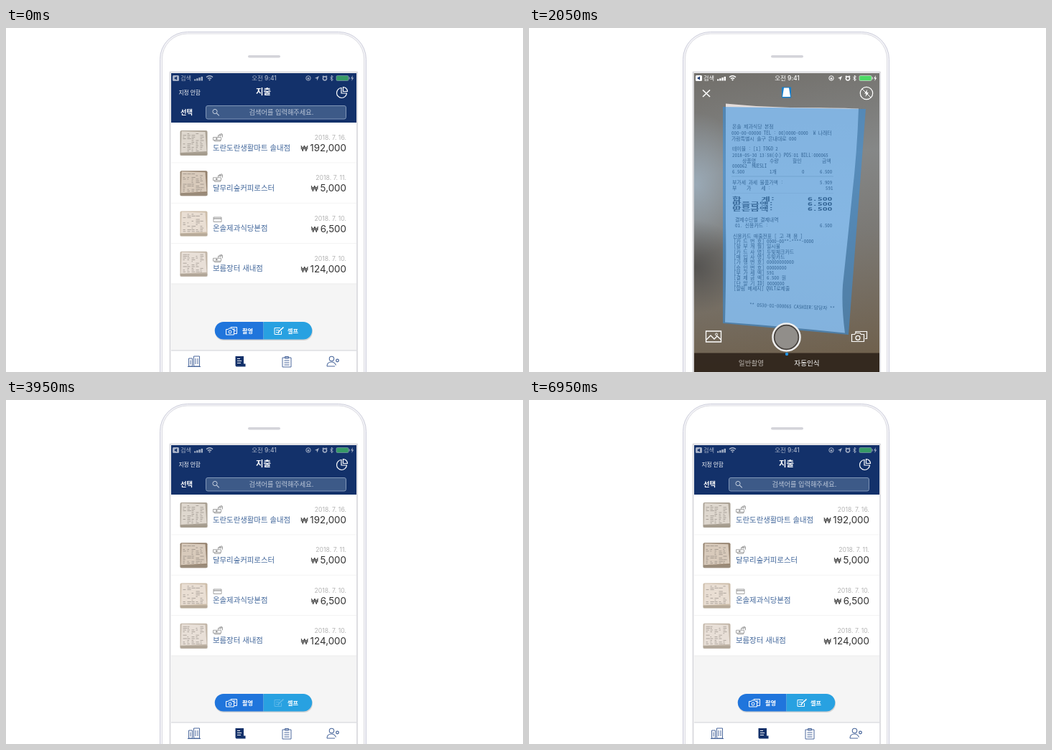
Write an HTML page that moves like this. It is 720x480 px and loops after 7000 ms.

```html
<!DOCTYPE html>
<html lang="ko">
<head>
<meta charset="utf-8">
<style>
html, body { margin: 0; width: 100%; height: 100%; overflow: hidden; background: #fff; }
svg { display: block; width: 720px; height: 480px; }
text { white-space: pre; font-family: Inter, "Noto Sans CJK KR", "Noto Sans CJK", sans-serif; }
.mono text { font-family: "Noto Sans Mono CJK KR", "Noto Sans CJK KR", "Noto Sans Mono", monospace; }
</style>
</head>
<body>
<svg id="stage" viewBox="0 0 720 480"></svg>
<script>
const NAVY = '#13316a', W = '#fff';
const text = (x, y, size, str, fill = W, extra = '') =>
  `<text x="${x}" y="${y}" font-size="${size}" fill="${fill}" ${extra}>${str}</text>`;
const rect = (x, y, w, h, fill, extra = '') =>
  `<rect x="${x}" y="${y}" width="${w}" height="${h}" fill="${fill}" ${extra}/>`;
const line = (d, stroke = W, w = 1, fill = 'none') =>
  `<path d="${d}" fill="${fill}" stroke="${stroke}" stroke-width="${w}"/>`;
const shape = (d, fill) => `<path d="${d}" fill="${fill}"/>`;
const disc = (x, y, r, fill, extra = '') => `<circle cx="${x}" cy="${y}" r="${r}" fill="${fill}" ${extra}/>`;
const ring = (x, y, r, stroke = W, w = 1) => disc(x, y, r, 'none', `stroke="${stroke}" stroke-width="${w}"`);
const at = (x, y, body) => `<g transform="translate(${x} ${y})">${body}</g>`;
const group = (id, body) => `<g id="${id}">${body}</g>`;
const BOLD = 'font-weight="700"', MID = 'text-anchor="middle"', END = 'text-anchor="end"';

let seed = 7;
const random = () => (seed = seed * 16807 % 2147483647) / 2147483647;

function statusBar() {
  const bars = [0, 1, 2, 3].map(i => rect(262 + i * 3.2, 71.5 - i * 1.2, 2.4, 2 + i * 1.2, W)).join('');
  return rect(232, 66, 9, 8, W, 'rx="1.5"') + shape('M238 67.5v5l-4-2.5z', NAVY) +
    text(243, 73, 8.2, '검색') + bars +
    line('M279 68.6q4.5-3.6 9 0M280.9 70.7q2.6-2 5.2 0', W, 1.4) + shape('M282 72l1.5 1.8 1.5-1.8q-1.5-1-3 0z', W) +
    text(359.5, 73, 8.5, '오전 9:41', W, MID + ' font-weight="500"') +
    ring(421, 70, 3.2) + rect(419.7, 69.3, 2.6, 2.2, W) +
    shape('M430 70l6-3-2.6 6.5-.6-3z', W) +
    ring(444, 70.3, 2.6, W, 1.5) + line('M440.8 68l1.6-1.4M445.6 66.6l1.6 1.4', W, 1.2) +
    line('M451.4 68l4 4-2 2v-8l2 2-4 4', W, .9) +
    rect(460, 66.5, 17, 7, '#4cd964', 'rx="1.5" stroke="#fff" stroke-width=".5"') + rect(477.6, 68.5, 1, 3, W) +
    shape('M482.8 66l-2.6 4.4h1.8l-.6 3.6 2.8-4.6h-1.8z', W);
}

function thumb(tone, paper) {
  let s = rect(0, 0, 38, 35, tone, 'rx="2"') + shape('M2 1l33 1 2 27-36 2z', paper);
  for (let y = 4; y < 28; y += 2.4) {
    for (let x = 4; x < 31; x += 6) {
      if (random() > .35) s += rect(x, y, 1.5 + random() * 4, .8, '#6d6660', 'opacity=".6"');
    }
  }
  return s + rect(0, 31, 38, 4, '#a2978a', 'opacity=".5"');
}

const cashIcon = line('M0 5.5h11v4h-11zM2 9.5v1.5h8v-1.5M7 5V2.5l6-1v4M8 3.2h4M8.5 1.5l4-1', '#999', .9) +
  disc(4.8, 7.5, 1.3, '#999');
const cardIcon = line('M.5 4.5h11v6.5h-11z', '#999', .9) + rect(.5, 5.8, 11, 1.3, '#999');

function listRow(i, name, date, sum, icon, tone, paper) {
  return at(0, 132 + i * 56.25,
    rect(230, 0, 258, 56.25, W) + rect(230, 55.7, 258, 1, '#ececec') +
    at(242.5, 11, thumb(tone, paper)) + at(288.5, 15, icon) +
    text(288, 38.5, 10.4, name, '#42679b') +
    text(474, 24, 8.7, date, '#b4b4b4', END) +
    text(474, 40, 13.4, `<tspan font-size="11">₩</tspan><tspan dx="2.5">${sum}</tspan>`, '#333', END));
}

function listPage() {
  const head = rect(230, 63, 258, 69, NAVY) +
    text(240.5, 93, 7.7, '지정 안함', W, 'font-weight="500"') + text(358.5, 93.3, 11.4, '지출', W, BOLD + MID) +
    line('M467 83.5a7 7 0 1 0 7.5 7.5h-7.5zM469.5 82.5v6h6a6 6 0 0 0-6-6z', W, 1.2) +
    text(243, 120.7, 9.2, '선택', W, BOLD) +
    rect(278.5, 108.5, 195, 18.5, '#3d5a88', 'rx="2.5" stroke="#8197b8"') +
    ring(291, 116.5, 3.1, '#c6d0df') + line('M293.3 118.8l3.5 3.5', '#c6d0df', 1.1) +
    text(383.5, 121, 9.2, '검색어를 입력해주세요.', '#bdc8d9', MID);
  const rows = listRow(0, '도란도란생활마트 솔내점', '2018. 7. 16.', '192,000', cashIcon, '#aaa194', '#ded7ce') +
    listRow(1, '달무리숲커피로스터', '2018. 7. 11.', '5,000', cashIcon, '#94816d', '#d8cabb') +
    listRow(2, '온솔제과식당본점', '2018. 7. 10.', '6,500', cardIcon, '#cdbda9', '#e9ded3') +
    listRow(3, '보름장터 새내점', '2018. 7. 10.', '124,000', cashIcon, '#c2b6a8', '#e8dfd7');
  const pill = rect(291, 411.5, 136, 24.5, '#000', 'rx="12.25" opacity=".14"') +
    shape('M358.5 410h-55.5a12.25 12.25 0 0 0 0 24.5h55.5z', '#2075dc') +
    shape('M358.5 410h55.5a12.25 12.25 0 0 1 0 24.5h-55.5z', '#28a1e1') +
    group('shootIcon', line('M306.5 420.5h3l1-1.5h4l1 1.5h2v7.5h-11zM313 418.5v-1h8.5v9h-4M315.5 420h4M318 422.5h2', W, 1) + ring(312, 424, 2)) +
    group('selfIcon', line('M382 418.5h-8v9h9.5v-4.5M376 421.5h4M376 424.5h2', W, 1) + line('M379 426l1-2.5 6.5-6', W, 1.7)) +
    text(336.5, 425.5, 8.2, '촬영', W, BOLD + MID) + text(399.5, 425.5, 8.2, '셀프', W, BOLD + MID);
  const C = '#4c699d';
  const tabs = rect(230, 450, 258, 32, W) + rect(230, 449.5, 258, 1, '#cfd2d8') +
    line('M254.5 472v-11h5v11zM261.5 472v-14h8v14zM253 472.5h18M257 463.5v6M264 461v8M267 461v8', C, 1) +
    shape('M319.5 458h11.5v10.5h2.5v4h-12.5q-1.5 0-1.5-2z', NAVY) +
    line('M322 461.5h4M322 464.5h6M322 467.5h5', W, 1) +
    line('M385 460h12v13h-12zM388.5 458.5h5v2.5h-5zM387.5 464h7M387.5 467h7M387.5 470h7', C, 1) +
    ring(453.5, 461.5, 3.2, C, 1.1) + line('M447 472q0-6 6.5-6 4 0 6 4.5M447 472h11', C, 1.1) +
    ring(461.5, 464, 1.8, C, 1.3);
  return rect(230, 63, 258, 420, '#f5f5f5') + head + rows + pill + tabs;
}

function keypad() {
  const letters = ['', 'ABC', 'DEF', 'GHI', 'JKL', 'MNO', 'PQRS', 'TUV', 'WXYZ'];
  const key = (col, row, digit, sub) => at(233.5 + col * 84.7, 350.5 + row * 33.7,
    rect(0, 1, 81, 29, '#8d9097', 'rx="3"') + rect(0, 0, 81, 29, W, 'rx="3"') +
    text(40, row < 3 ? 15.8 : 20, 16, digit, '#111', MID) +
    text(40.5, 24.7, 6, sub, '#222', MID + ' font-weight="600" letter-spacing="1"'));
  return rect(230, 319, 258, 28, '#f6f6f6') + text(240, 336.5, 10.9, '기호변환', '#2f92e6') +
    rect(230, 347, 258, 140, '#d1d4da') +
    letters.map((sub, i) => key(i % 3, i / 3 | 0, i + 1, sub)).join('') + key(1, 3, 0, '') +
    line('M442 460.5h10.5v9.5h-10.5l-4.5-4.75zM444.5 463l4.5 4.5m0-4.5l-4.5 4.5', '#333', 1.1);
}

function formPage() {
  const rule = y => rect(230, y, 258, 1, '#e8e8e8');
  return rect(230, 63, 258, 420, W) + rect(230, 63, 258, 63.5, NAVY) +
    line('M248 90.5h-12m5-5l-5 5 5 5', W, 1.4) +
    text(358.5, 93.3, 11.4, '지출', W, BOLD + MID) + text(476.5, 93.5, 10.9, '등록', W, BOLD + END) +
    rect(263, 112, 13, 9, W, 'rx="1"') + rect(263, 114.5, 13, 1.5, NAVY) +
    line('M272 109.5h9M278 112.5h4M278 115.5h5M278 118.5h5', W, 1.5) +
    line('M348 117.5v-4l5-1 3-3h6l4 3 3 1.5v3.5zM352 113h14M360 110v3', W, 1.1) +
    disc(352.5, 118, 2, NAVY, 'stroke="#fff"') + disc(364.5, 118, 2, NAVY, 'stroke="#fff"') +
    ring(444.7, 114.8, 7, W, 1.3) + line('M444.7 110.5v4.8l3.5 1.7', W, 1.2) +
    rect(243, 124.5, 59, 2, W) +
    text(243, 144.5, 7.6, '금액', '#777') + text(243.5, 171.5, 25, '0', '#1b84e8') +
    rect(243, 150.5, 1.3, 25, '#3a8fe8', 'id="caret"') +
    rect(377.5, 155.5, 34, 14, W, 'rx="2.5" stroke="#a4a4a4"') + text(394.5, 165.2, 7.4, 'KRW', '#666', MID) +
    rect(422, 131, 52, 47, '#f3f3f3', 'rx="2"') +
    line('M434.5 148h6l2-3h8l2 3h6.5v13.5h-24.5z', '#a9a9a9', 1.2) + ring(446.5, 154, 4.5, '#a9a9a9', 1.2) +
    disc(458.5, 160.3, 5.2, NAVY) + line('M456 160.3h5m-2.5-2.5v5', W, 1.2) +
    rule(183) + text(243, 207.5, 11.4, '상호', '#9a9a9a') +
    rule(223.5) + text(243, 238.5, 7.6, '날짜', '#777') + text(244, 255, 10.7, '2018. 7. 18.', '#444') +
    line('M464 244.5h10m-5-5v10', '#b5b5b5', 1) +
    rule(264) + text(243, 289, 11.6, '카테고리', '#9a9a9a') + line('M467 279.5l6 5.5-6 5.5', '#aaa', 1.2) +
    rule(305) + group('keys', keypad());
}

function receipt() {
  const ink = '#39353a', t = (x, y, s) => text(x, y + 2.5, 6.9, s, ink, 'font-weight="500"');
  const wide = (y, label) => `<g transform="translate(286 ${y + 2.5}) scale(2 .95)">` +
    text(0, 0, 6.9, label, ink, BOLD) + text(52.5, 0, 6.9, '6.500', ink, BOLD) + '</g>';
  const pairs = ['카 드 번 호] 0000-00**-****-0000', '할 부 개 월] 일시불', '카 드 사 명] 두빛체크카드',
    '매 입 사 명] 두빛카드', '가 맹 번 호] 00000000000', '승 인 번 호] 00000000', '부 가 세 액] 591',
    '결 제 금 액] 6.500 원', '단 말 기 ID] 0000000', '알림 메세지] QVLT로제출'];
  return shape('M277 107q40 4 90 5.500 60 0 95 1.500-2 60-9 121-6 60-13 125-2 30 3 67-85-9-167-15 2-80 1-140z', 'url(#paper)') +
    '<g class="mono">' +
    t(286, 139, '온솔 제과식당 본점') + t(285, 147.5, '000-00-00000 TEL : 00)0000-0000  W 나래터') +
    t(285, 156, '가람특별시 솔구 은내대로 000') + t(286, 170, '테이블 : [1] TOGO 2') +
    t(286, 179, '2018-05-30 13:58(수) POS:01 BILL:000065') +
    t(300, 186.5, '상품명') + t(338, 186.5, '수량') + t(370, 186.5, '할인') + t(411, 186.5, '금액') +
    t(286, 194, '000062  MUESLI') + t(286, 201.5, '6.500') + t(338, 201.5, '1개') + t(383, 201.5, '0') + t(408, 201.5, '6.500') +
    line('M285 208.5h142', '#aaa3a0', .6) +
    t(286, 217, '부가세 과세 물품가액 :') + t(408, 217, '5.909') + t(286, 225, '부    가    세 :') + t(416, 225, '591') +
    line('M285 232h142', '#c4bcb8', .5) +
    wide(239.5, '합    계:') + wide(246.8, '받을금액:') + wide(254, '받은금액:') +
    t(290, 269, '결제수단별 결제내역') + t(290, 276.5, '01. 신용카드 :') + t(408, 276.5, '6.500') +
    t(287, 291.5, '신용카드 매출전표 [ 고 객 용 ]') +
    pairs.map((s, i) => t(288, 299 + i * 7.35, '[' + s)).join('') +
    '<g transform="rotate(2.5 310 388)">' + t(310, 387.5, '** 0530-01-000065 CASHIER:담당자 **') + '</g></g>';
}

function cameraPage() {
  const glow = (x, y, rx, ry, fill) => `<ellipse cx="${x}" cy="${y}" rx="${rx}" ry="${ry}" fill="url(#${fill})"/>`;
  const scene = rect(220, 55, 290, 440, 'url(#metal)') + glow(236, 220, 75, 100, 'gleam') +
    glow(232, 335, 75, 65, 'dusk') + receipt();
  return rect(230, 63, 258, 420, '#141414') + rect(230, 365, 258, 120, '#050505') +
    group('photo', group('scene', scene) + rect(230, 453.5, 258, 30, '#2a2018', 'opacity=".86"')) +
    '<path id="found" d="M270 110L469 113 445 428 270 412z" fill="#3392e6" opacity="0"/>' +
    line('M242 86.5l10 9.5m0-9.5l-10 9.5', W, 1.6) +
    rect(352, 82.5, 13, 15, '#187fcb') + shape('M355 83.5h7l2 12.5h-11z', W) +
    ring(470, 91, 8.7, W, 1.2) + shape('M471 86l-4 5.5h2.5l-1 4.5 4.5-6h-2.500z', W) + line('M464 85l12 12', W, 1) +
    line('M246.5 423h21v15h-21zM247 435l6-6 5 5 4-4 5.5 5', W, 1.3) + ring(261, 427.5, 1.5) +
    line('M455 426v-2.5h15.5v10h-2.5M449.5 427.5h4l1.5-2h6l1.5 2h4v10h-17z', W, 1.2) + ring(458, 432.3, 3, W, 1.2) +
    disc(358.5, 431.5, 19, '#47423e', 'stroke="#eee" stroke-width="2.5"') + disc(358.5, 431.5, 16, '#918e8a') +
    disc(359, 455, 2.2, '#2294e6') +
    text(309.5, 470.5, 9.6, '일반촬영', '#b9b3ad', MID) + text(387, 470.5, 9.6, '자동인식', W, MID + ' font-weight="500"');
}

const $ = id => document.getElementById(id);
const fadeOut = (id, color, opacity) => `<radialGradient id="${id}"><stop stop-color="${color}" stop-opacity="${opacity}"/>` +
  `<stop offset="1" stop-color="${color}" stop-opacity="0"/></radialGradient>`;
$('stage').innerHTML = `<defs>
  <clipPath id="screen"><rect x="229.5" y="63" width="258.5" height="420"/></clipPath>
  <linearGradient id="metal" x2=".1" y2="1"><stop stop-color="#706d68"/><stop offset=".35" stop-color="#858787"/><stop offset=".6" stop-color="#7b7975"/><stop offset="1" stop-color="#6f604c"/></linearGradient>
  <linearGradient id="paper" x2="0" y2="1"><stop stop-color="#e3dcda"/><stop offset=".5" stop-color="#e9e3e0"/><stop offset="1" stop-color="#e5dbd4"/></linearGradient>
  ${fadeOut('gleam', '#a3b8ca', .7)}${fadeOut('dusk', '#3a3a3a', .6)}
  </defs>` +
  rect(214.5, 5.5, 287, 560, '#f3f3f7', 'rx="38" stroke="#cccdda"') +
  rect(217.5, 8, 281, 560, W, 'rx="35" stroke="#dcdce2"') +
  rect(337, 38, 45, 3.5, '#d4d4da', 'rx="1.75"') +
  rect(228.5, 61.5, 260.5, 430, W, 'stroke="#d3d3d8" stroke-width="1.5"') +
  '<g clip-path="url(#screen)">' + group('list', listPage()) + group('form', formPage()) +
  '<g id="camera" clip-path="url(#screen)">' + cameraPage() + '</g>' + group('status', statusBar()) + '</g>';

const clamp = v => Math.max(0, Math.min(1, v));
// Critically damped spring from 0 to 1, time in ms.
const spring = (t, start) => {
  const k = Math.max(0, t - start) * .0183;
  return 1 - (1 + k) * Math.exp(-k);
};
const move = (id, x, y) => $(id).setAttribute('transform', `translate(${x.toFixed(2)} ${y.toFixed(2)})`);
const fade = (id, v) => $(id).setAttribute('opacity', v);

function draw(t) {
  const up = spring(t, 707) - spring(t, 2507);
  const push = spring(t, 4150) - spring(t, 5950);
  const keys = spring(t, 4450) - spring(t, 5850);
  const drift = clamp((t - 1600) / 900);
  move('camera', 0, 418 * (1 - up));
  move('list', -77 * push, 0);
  move('form', 259 * (1 - push), 0);
  move('keys', 0, 164 * (1 - keys));
  move('scene', -6 * drift, -3 * drift);
  fade('photo', clamp((t - 1150) / 150));
  fade('found', .55 * clamp((t - 1900) / 100));
  fade('shootIcon', t > 580 && t < 900 ? .25 : 1);
  fade('selfIcon', t > 3880 && t < 4300 ? .25 : 1);
  fade('caret', (t - 4500) % 1000 < 600 ? 1 : 0);
  fade('status', up > .95 ? 1 : .62);
}

function tick(now) {
  draw(now % 7000);
  requestAnimationFrame(tick);
}
draw(0);
requestAnimationFrame(tick);
</script>
</body>
</html>
```
